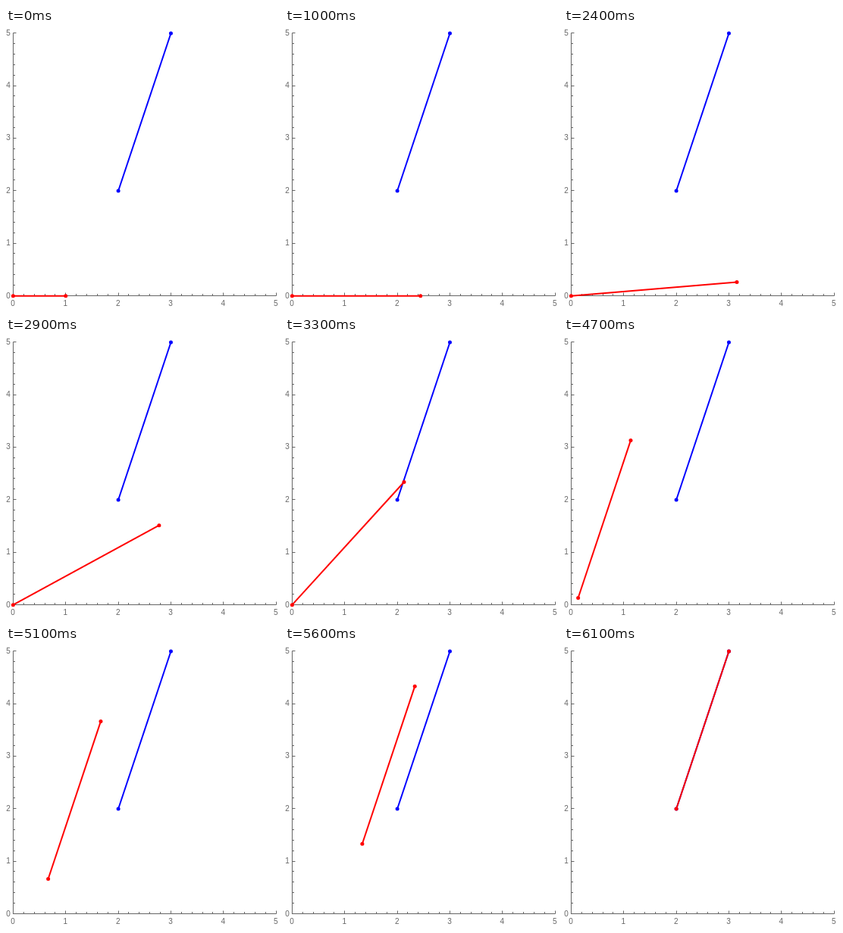
Write an HTML page with a canvas that moves like this. It is 360 px wide and 371 px high and loops after 7700 ms.

```html
<!DOCTYPE html>
<html>
<head>
<meta charset="utf-8">
<style>
  html, body { margin: 0; width: 100%; height: 100%; overflow: hidden; background: #fff; }
  canvas { display: block; width: 360px; height: 371px; }
</style>
</head>
<body>
<canvas id="stage"></canvas>
<script>
const W = 360, H = 371, LOOP = 7700;
const STEP = 100, STEPS = 15;
const UNIT = 69.35, X0 = 9.4, Y0 = 353.7;
const AXIS_X = 9.5, AXIS_Y = 353.5;

const canvas = document.getElementById('stage');
const ctx = canvas.getContext('2d');
const dpr = window.devicePixelRatio || 1;
canvas.width = Math.round(W * dpr);
canvas.height = Math.round(H * dpr);

const px = x => X0 + x * UNIT;
const py = y => Y0 - y * UNIT;
const snap = v => Math.floor(v) + 0.5;

// Share of a phase completed, advancing in equal discrete steps
function progress(t, start) {
  const n = Math.floor((t - start) / STEP) + 1;
  return Math.min(STEPS, Math.max(0, n)) / STEPS;
}

function line(x1, y1, x2, y2) {
  ctx.beginPath();
  ctx.moveTo(x1, y1);
  ctx.lineTo(x2, y2);
  ctx.stroke();
}

function drawAxes() {
  ctx.strokeStyle = ctx.fillStyle = '#666';
  ctx.lineWidth = 1;
  line(AXIS_X - 0.5, AXIS_Y, 356.5, AXIS_Y);
  line(AXIS_X, 6.5, AXIS_X, AXIS_Y + 0.5);

  for (let i = 0; i <= 25; i++) {
    const len = i % 5 ? 2.5 : 4;
    const x = snap(px(i / 5)), y = snap(py(i / 5) - 0.3);
    line(x, AXIS_Y, x, AXIS_Y - len);
    line(AXIS_X, y, AXIS_X + len, y);
  }

  ctx.font = '10px "Liberation Sans", Arial, sans-serif';
  for (let n = 0; n <= 5; n++) {
    ctx.textAlign = 'center';
    ctx.fillText(n, px(n) - 0.4, 366.5);
    ctx.textAlign = 'right';
    ctx.fillText(n, 5.7, py(n) + 2.8);
  }
}

function drawSegment(x, y, dx, dy, color) {
  const ends = [[px(x), py(y)], [px(x + dx), py(y + dy)]];
  ctx.strokeStyle = ctx.fillStyle = color;
  ctx.lineWidth = 2;
  line(...ends[0], ...ends[1]);
  for (const [cx, cy] of ends) {
    ctx.beginPath();
    ctx.arc(cx, cy, 2.5, 0, Math.PI * 2);
    ctx.fill();
  }
}

function draw(t) {
  // Stretch, then rotate, then translate onto the blue segment
  const length = 1 + (Math.sqrt(10) - 1) * progress(t, 100);
  const angle = Math.atan(3) * progress(t, 2400);
  const shift = 2 * progress(t, 4700);

  ctx.setTransform(dpr, 0, 0, dpr, 0, 0);
  ctx.fillStyle = '#fff';
  ctx.fillRect(0, 0, W, H);
  drawAxes();
  drawSegment(2, 2, 1, 3, '#00f');
  drawSegment(shift, shift, length * Math.cos(angle), length * Math.sin(angle), '#f00');
}

const start = performance.now();
function tick() {
  draw((performance.now() - start) % LOOP);
  requestAnimationFrame(tick);
}
tick();
</script>
</body>
</html>
```
